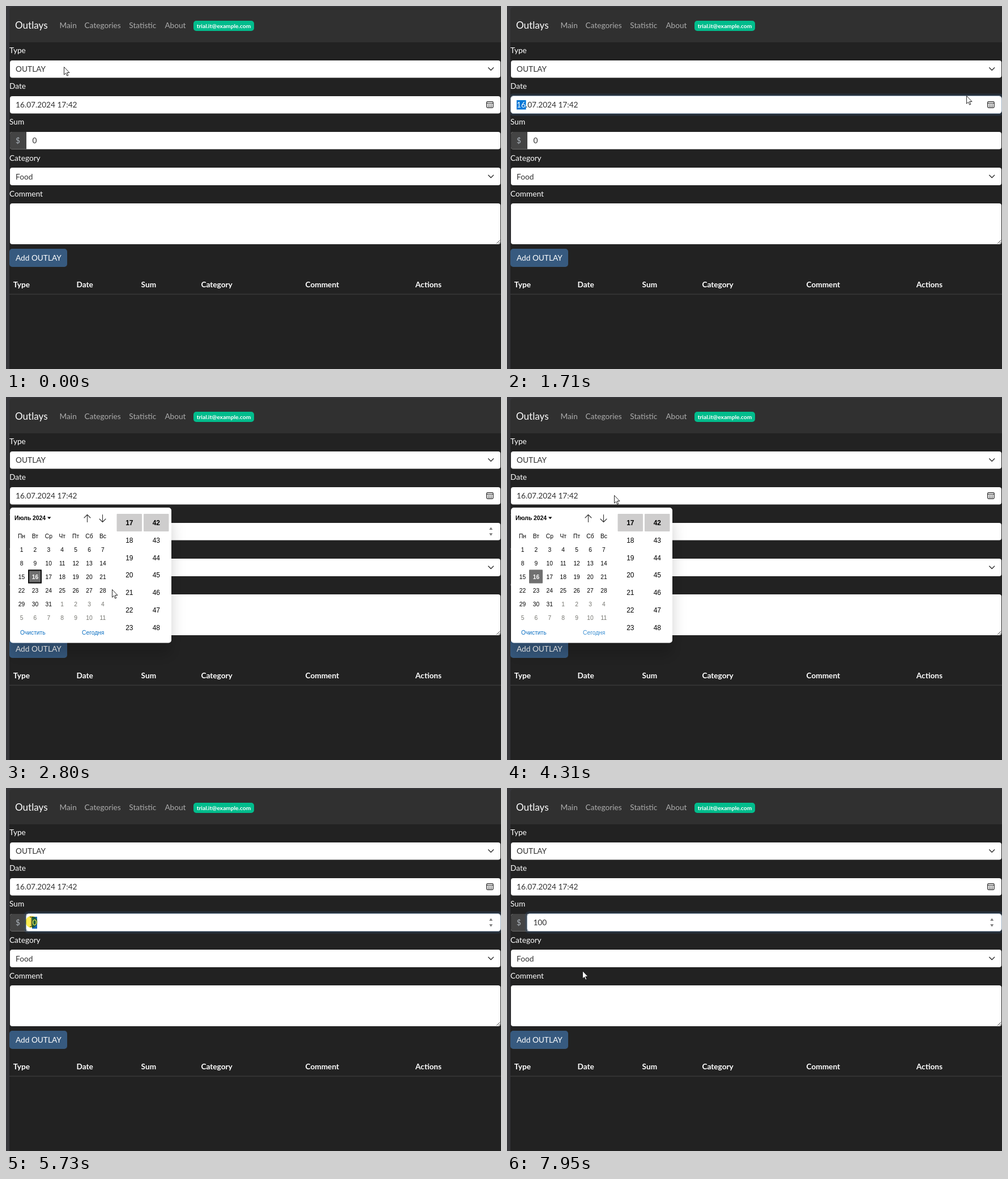
These frames come from a looping animation (874x640 px, 8000 ms). An HTML page:

```html
<!DOCTYPE html>
<html lang="en">
<head>
<meta charset="utf-8">
<title>Outlays</title>
<style>
  html, body { margin: 0; width: 874px; height: 640px; overflow: hidden; background: #222; }
  svg { display: block; font: 13.66px Lato, sans-serif; }
  .bold { font-weight: 700; }
  .nav { fill: #acacac; }
  .ui { font: 10.25px "Liberation Sans", sans-serif; text-anchor: middle; }
  .title { font-size: 10.4px; font-weight: 700; text-anchor: start; }
  .time { font-size: 11.95px; }
  .other { fill: #75756f; }
  .link { fill: #0b6fc2; }
  .hover { fill: #3b8fd2; }
  .line { fill: none; stroke: #303030; stroke-linecap: round; stroke-linejoin: round; }
  #click { mix-blend-mode: multiply; }
</style>
</head>
<body>
<svg id="stage" width="874" height="640" viewBox="0 0 874 640"></svg>
<script>
const LOOP = 8000;
const rowY = i => Math.round(96 + 63.1 * i);

const rect = (x, y, w, h, fill, rx = 0, extra = '') =>
  `<rect x="${x}" y="${y}" width="${w}" height="${h}" fill="${fill}" rx="${rx}" ${extra}/>`;
const text = (x, y, str, fill = '#fff', extra = '') =>
  `<text x="${x}" y="${y}" fill="${fill}" ${extra}>${str}</text>`;
const label = (x, y, str, cls = '', fill = '#000') => text(x, y, str, fill, `class="${cls}"`);
const group = (id, body, extra = '') => `<g id="${id}" ${extra}>${body}</g>`;
const chevron = y => `<path class="line" stroke-width="1.4" d="M851.7 ${y - 2.2}l4.5 4.5 4.5-4.5"/>`;

function ring(id, x, y) {
  const w = 874 - x;
  return group(id,
    rect(x - 1.7, y - 2.7, w + 3.4, 35.4, 'none', 6, 'stroke="#375a7f" stroke-opacity=".25" stroke-width="3.4"') +
    rect(x + .5, y - .5, w - 1, 31, 'none', 4.5, 'stroke="#9badbf"'));
}

function navbar() {
  const links = [[94.6, 'Main'], [138.6, 'Categories'], [217.3, 'Statistic'], [280.4, 'About']];
  return rect(0, 0, 874, 64, '#303030') +
    text(16, 40, 'Outlays', '#fff', 'font-size="17.08"') +
    links.map(([x, s]) => label(x, 39, s, 'nav')).join('') +
    rect(331, 26, 107, 18, '#00bc8c', 5) +
    text(384.5, 38.5, 'trial.it@example.com', '#fff', 'class="bold" font-size="10.25" text-anchor="middle"');
}

function calendarIcon() {
  let dots = '';
  for (let i = 0; i < 6; i++)
    dots += rect(850.9 + (i % 3) * 2.8, 173.6 + (i > 2 ? 2.7 : 0), 1.5, 1.5, '#222');
  return rect(848.6, 168.6, 11.6, 10.8, 'none', 1.8, 'stroke="#222" stroke-width="1.2"') +
    rect(849, 171, 11, 1, '#222') + dots;
}

function form() {
  const labels = ['Type', 'Date', 'Sum', 'Category', 'Comment'];
  const heads = [[12.8, 'Type'], [124.5, 'Date'], [238.6, 'Sum'], [344.4, 'Category'], [528.5, 'Comment'], [722.8, 'Actions']];
  return labels.map((s, i) => text(6, Math.round(83 + 63.2 * i), s)).join('') +
    [0, 1, 2, 3].map(i => rect(7, rowY(i), 866, i == 3 ? 31 : 30.5, '#fff', 4)).join('') +
    rect(7, 348, 866, 72, '#fff', 4) +
    text(17.1, 116, 'OUTLAY', '#303030') + chevron(111) +
    text(17.1, 179, '16.07.2024 17:42', '#303030') + calendarIcon() +
    '<path fill="#444" d="M36 222H11a4 4 0 0 0-4 4v22.5a4 4 0 0 0 4 4h25z"/>' +
    text(17, 242, '$', '#adb5bd') +
    text(17.1, 305.5, 'Food', '#303030') + chevron(300.5) +
    '<path class="line" stroke-width=".9" d="M866.5 418.500l5.500-5.500M870 418.500l2-2"/>' +
    rect(6, 428, 102, 32, '#375a7f', 5) + text(17, 448.700, 'Add OUTLAY') +
    heads.map(([x, s]) => label(x, 496, s, 'bold', '#fff')).join('') +
    rect(6, 507.6, 868, 1, '#444');
}

function dropdown() {
  return rect(6.5, 131, 867, 35.5, '#fff', 4) +
    '<path fill="#757575" d="M6.500 149V135a4 4 0 0 1 4-4h859a4 4 0 0 1 4 4v14z"/>' +
    text(17.1, 145, 'OUTLAY') + text(17.1, 162, 'INCOME', '#303030');
}

function calendar() {
  const colX = i => 27.5 + 23.9 * i;
  let s = rect(7, 195, 285, 238.5, '#fff', 5) +
    label(15, 217, 'Июль 2024', 'ui title') +
    '<path d="M73 211.500h6.500l-3.250 3.800z"/>' +
    '<path class="line" stroke-width="1.1" d="M143.500 220.500v-13m-5.500 5.500l5.500-5.500 5.500 5.500M170.500 207.500v13m-5.500-5.500l5.500 5.500 5.500-5.500"/>';
  ['Пн', 'Вт', 'Ср', 'Чт', 'Пт', 'Сб', 'Вс'].forEach((d, i) => s += label(colX(i), 248.5, d, 'ui'));
  s += rect(39, 304.5, 24, 24, '#707070', 1) +
    rect(40, 305.5, 22, 22, 'none', 0, 'id="dayBox" stroke="#101010" stroke-width="2"');
  for (let i = 0; i < 42; i++) {
    const x = colX(i % 7), y = 272.8 + 24 * Math.floor(i / 7);
    s += i == 15
      ? text(x, y, 16, '#fff', 'class="ui" style="font-weight:700"')
      : label(x, y, i % 31 + 1, i > 30 ? 'ui other' : 'ui');
  }
  [[195.5, 17], [243, 42]].forEach(([x, first]) => {
    s += rect(x, 206, 44.5, 31, '#cecdcd', 1);
    for (let i = 0; i < 7; i++)
      s += text(x + 22.3, 226.2 + 30.75 * i, first + i, '#000', `class="ui time" ${i ? '' : 'style="font-weight:700"'}`);
  });
  return s + label(47.3, 419, 'Очистить', 'ui link') +
    text(153.7, 419, 'Сегодня', '#000', 'id="today" class="ui link"');
}

const $ = id => document.getElementById(id);
$('stage').innerHTML =
  `<defs><filter id="shadow" filterUnits="userSpaceOnUse" x="0" y="0" width="874" height="640">
    <feDropShadow dx="0" dy="22" stdDeviation="12" flood-color="#000" flood-opacity=".18"/>
  </filter></defs>` +
  rect(0, 0, 874, 640, '#222') + navbar() + form() +
  ring('ringType', 6, 96) + ring('ringDate', 6, 159) + ring('ringSum', 35, 222) +
  group('dateMark', rect(17, 166, 16.5, 16.5, '#0078d7') + text(17.1, 179, '16')) +
  rect(46, 227, 9, 21, '#1a66bd', 0, 'id="sumMark"') +
  text(46.4, 242.4, '0', '#303030', 'id="sum"') +
  group('spin', '<path fill="#777" d="M853.200 234h6l-3-4.500zM853.200 240.300h6l-3 4.500z"/>') +
  group('list', dropdown(), 'filter="url(#shadow)"') +
  group('picker', calendar(), 'filter="url(#shadow)"') +
  '<path fill="#37373b" d="M0 0H874V2H12Q6 2 6 8V640H0z"/>' +
  '<circle id="click" r="10.5" fill="#ffec50"/>' +
  group('arrow', '<path fill="#fff" stroke="#111" stroke-width=".9" d="M.5.5V14.200L3.600 11.300 5.700 16.200 7.800 15.300 5.700 10.500H10z"/>') +
  group('beam', '<path fill="none" stroke="#222" d="M-3-8.500h2.500l.5.500.5-.5H3M-3 8.500h2.500l.5-.5.5.5H3M0-8V8"/>');

// Pointer path as [tick, x, y]; the recording advances in ticks of about 100 ms.
const path = [
  [0, 102, 107], [4, 102, 107], [8, 85, 140], [12, 85, 140], [16, 730, 152], [17, 811, 158],
  [20, 853, 172], [23, 853, 172], [25, 790, 215], [28, 187, 339], [29, 172, 376], [31, 155, 414],
  [38, 155, 414], [43, 189, 173], [46, 189, 173], [54, 101, 236], [57, 45, 236], [59, 42, 235],
  [74, 42, 235], [76, 151, 235], [77, 151, 235], [79, 133, 322], [80, 133, 322]
];

function pointer(tick) {
  const i = path.findIndex(p => p[0] > tick);
  if (i < 0) return path[path.length - 1].slice(1);
  const [a, ax, ay] = path[i - 1], [b, bx, by] = path[i];
  const k = (tick - a) / (b - a);
  return [ax + (bx - ax) * k, ay + (by - ay) * k];
}

const show = (id, on) => $(id).style.display = on ? '' : 'none';

function render(t) {
  const tick = Math.floor((t + 20) / 100.5);
  const within = (...spans) => spans.some(([a, b]) => tick >= a && tick < b);
  const [x, y] = pointer(tick);
  const dateFocus = within([14, 22], [44, 54]);

  show('ringType', within([1, 14]));
  show('ringDate', dateFocus);
  show('dateMark', dateFocus);
  show('ringSum', tick >= 54);
  show('spin', within([25, 29], [53, 99]));
  show('list', within([1, 11]));
  $('list').style.opacity = tick == 1 ? .6 : 1;
  show('picker', within([22, 44]));
  show('dayBox', tick < 35);
  $('today').setAttribute('class', tick >= 30 ? 'ui hover' : 'ui link');

  const marked = within([56, 66]);
  const typed = tick < 66 ? '0' : '100'.slice(0, Math.min(3, 1 + Math.floor((tick - 66) / 2)));
  show('sumMark', marked);
  $('sum').textContent = typed;
  $('sum').setAttribute('fill', marked ? '#fff' : '#303030');

  const beam = tick > 46 && y > 221 && y < 252;
  show('beam', beam);
  show('arrow', !beam);
  $(beam ? 'beam' : 'arrow').setAttribute('transform', `translate(${x} ${y})`);
  show('click', within([1, 3], [21, 23], [35, 36], [44, 45], [54, 60]));
  $('click').setAttribute('transform', `translate(${x} ${y})`);
}

const start = performance.now();
function frame() {
  render((performance.now() - start) % LOOP);
  requestAnimationFrame(frame);
}
frame();
</script>
</body>
</html>
```
